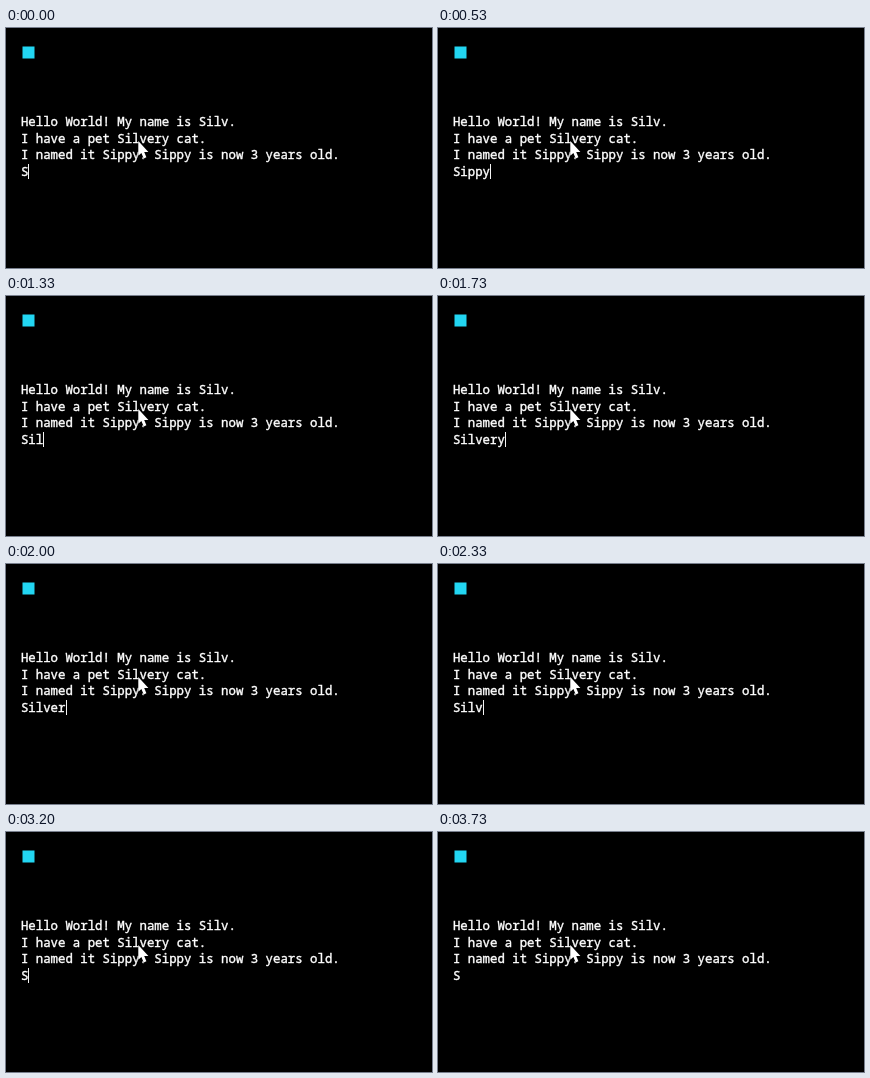
An HTML page that plays this animation: 426x240 px, repeating every 3.79 s.

```html
<!DOCTYPE html>
<html lang="en">
<head>
<meta charset="utf-8">
<title>Typing</title>
<style>
  html, body { margin: 0; width: 100%; height: 100%; overflow: hidden; background: #000; }
  svg { display: block; width: 426px; height: 240px; }
  text {
    font: 12.37px "Noto Sans Mono", monospace;
    fill: #fff; stroke: #fff; stroke-width: .4px;
  }
</style>
</head>
<body>
<svg viewBox="0 0 426 240">
  <rect width="426" height="240"/>
  <rect x="16.5" y="18.5" width="12" height="12" fill="#22d6f2"/>
  <text x="14.9" y="98">Hello World! My name is Silv.</text>
  <text x="14.9" y="114.6">I have a pet Silvery cat.</text>
  <text x="14.9" y="131.2">I named it Sippy. Sippy is now 3 years old.</text>
  <text id="typed" x="14.9" y="147.9">S</text>
  <rect id="caret" y="136" width="1" height="15" fill="#f4f4f4"/>
  <path d="M132.3 113V127.8L135.4 125L137.7 130.4L140.4 129.3L138.2 124H142.4Z"
        fill="#fff" stroke="#000" stroke-width=".6" paint-order="stroke"/>
</svg>
<script>
  const LOOP = 3790, LEFT = 15, ADVANCE = 7.42;
  const typed = document.getElementById('typed');
  const caret = document.getElementById('caret');

  // word, letters before, letters after, time of first key, time of last key
  const runs = [
    ['Sippy', 1, 5, 265, 520],
    ['Sippy', 5, 2, 720, 1060],
    ['Silvery', 2, 7, 1260, 1700],
    ['Silvery', 7, 4, 1890, 2325],
    ['Silvery', 4, 1, 2935, 3135]
  ];
  const blinks = [[2865, 2935], [3665, LOOP]];

  function textAt(t) {
    const run = runs.findLast(r => t >= r[3]);
    if (!run) return 'S';
    const [word, from, to, start, end] = run;
    const keys = Math.abs(to - from);
    const gap = (end - start) / (keys - 1);
    const done = Math.min(keys, Math.floor((t - start) / gap + 1e-6) + 1);
    return word.slice(0, from + Math.sign(to - from) * done);
  }

  function draw() {
    const t = performance.now() % LOOP;
    const text = textAt(t);
    const hidden = blinks.some(([off, on]) => t >= off && t < on);
    typed.textContent = text;
    caret.setAttribute('x', Math.round(LEFT + text.length * ADVANCE));
    caret.setAttribute('visibility', hidden ? 'hidden' : 'visible');
    requestAnimationFrame(draw);
  }
  draw();
</script>
</body>
</html>
```
